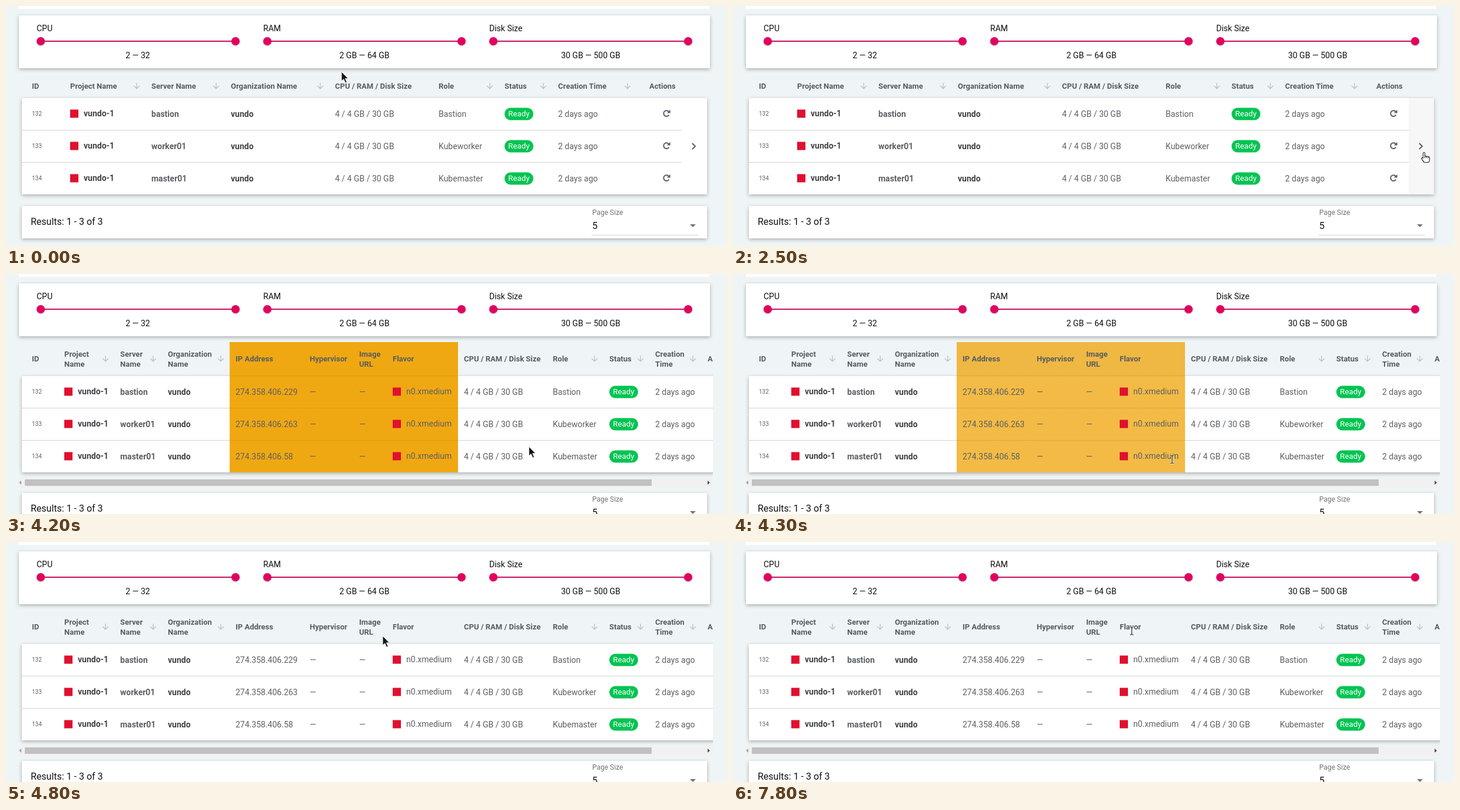
Animation of 1225 by 409 pixels, one loop 8000 ms. Source, as an HTML page:

```html
<!DOCTYPE html>
<html lang="en">
<head>
<meta charset="utf-8">
<title>Server table</title>
<style>
  html, body { margin: 0; width: 100%; height: 100%; overflow: hidden; background: #eff5f6; }
  svg { display: block; width: 1225px; height: 409px; font: 14px Roboto, sans-serif; fill: #5c6064; }
  .card { fill: #fff; filter: drop-shadow(0 2px 3px rgba(0,0,0,.3)); }
  .head { font-size: 13px; font-weight: 700; fill: #565c60; }
  .bold { font-weight: 700; }
  .name { font-weight: 700; fill: #3e4245; }
  .id { font-size: 10px; }
  .black { fill: #111; }
  .big { font-size: 16px; fill: #111; }
  .small { font-size: 12px; fill: #757575; }
  .badge { font-size: 13.3px; fill: #fff; }
  .rule { stroke: #d0d3d4; }
  .knob { fill: #e2005f; filter: drop-shadow(0 1px 1px rgba(0,0,0,.3)); }
  .icon { fill: none; stroke: #5a5f63; stroke-width: 2; }
</style>
</head>
<body>
<svg id="stage" viewBox="0 0 1225 409"></svg>
<script>
const LOOP = 8000, STEP = 100;
const stage = document.getElementById('stage');

const text = (x, y, s, cls = '', extra = '') =>
  `<text x="${x}" y="${y}" class="${cls}" ${extra}>${s}</text>`;
const rect = (x, y, w, h, attrs) =>
  `<rect x="${x}" y="${y}" width="${w}" height="${h}" ${attrs}/>`;
const rule = (x1, x2, y, attrs = 'class="rule"') =>
  `<path d="M${x1} ${y}H${x2}" ${attrs}/>`;
const mark = (x, y) => rect(x, y - 7, 14, 14, 'fill="#e0102f"');
const sortArrow = (x, y) =>
  `<path transform="translate(${x - 8} ${y - 8}) scale(.667)" fill="#bcc1c3"
    d="M20 12l-1.41-1.41L13 16.17V4h-2v12.17l-5.58-5.59L4 12l8 8 8-8z"/>`;

// Cell painters: x, row centre, value
const plain = (x, y, v) => text(x, y + 5, v);
const bold = (x, y, v) => text(x, y + 5, v, 'bold');
const named = (x, y, v) => text(x, y + 5, v, 'name');
const number = (x, y, v) => text(x, y + 3, v, 'id');
const project = (x, y, v) => mark(x, y - .5) + text(x + 23, y + 4, v, 'name');
const flavor = (x, y, v) => mark(x, y - .5) + text(x + 23, y + 4, v);
const badge = (x, y, v) =>
  rect(x, y - 10.5, 49, 21, 'rx="10.5" fill="#03c452"') + text(x + 24.5, y + 4, v, 'badge', 'text-anchor="middle"');
const reload = (x, y) =>
  `<g transform="translate(${x + 29} ${y - 1})"><path class="icon" d="M4 -3A4.9 4.9 0 1 0 4.4 2.6"/>
    <path fill="#5a5f63" d="M6.6 -6.2V-.6H1z"/></g>`;

const same = v => [v, v, v];
// heading, wide x, wide arrow x, narrow x, narrow arrow x, painter, values
const columns = [
  ['ID', 44, 0, 44, 0, number, [132, 133, 134]],
  ['Project Name', 109, 222, 99, 169, project, same('vundo-1')],
  ['Server Name', 247, 357, 194, 250, bold, ['bastion', 'worker01', 'master01']],
  ['Organization Name', 382, 534, 275, 365, named, same('vundo')],
  ['IP Address', 0, 0, 390, 0, plain, ['274.358.406.229', '274.358.406.263', '274.358.406.58']],
  ['Hypervisor', 0, 0, 516, 0, plain, same('—')],
  ['Image URL', 0, 0, 600, 0, plain, same('—')],
  ['Flavor', 0, 0, 657, 0, flavor, same('n0.xmedium')],
  ['CPU / RAM / Disk Size', 559, 0, 778, 0, plain, same('4 / 4 GB / 30 GB')],
  ['Role', 735, 822, 929, 1000, plain, ['Bastion', 'Kubeworker', 'Kubemaster']],
  ['Status', 847, 913, 1025, 1078, badge, same('Ready')],
  ['Creation Time', 938, 1056, 1103, 1167, plain, same('2 days ago')],
  ['Actions', 1093, 0, 1192, 0, reload, same('')]
];
const wrapped = ['Project Name', 'Server Name', 'Organization Name', 'Image URL', 'Creation Time'];

function column([title, wideX, wideArrow, narrowX, narrowArrow, paint, values], expanded) {
  const x = expanded ? narrowX : wideX, arrow = expanded ? narrowArrow : wideArrow;
  if (!x) return '';
  const mid = expanded ? 144.5 : 136.5, firstRow = expanded ? 201 : 184;
  const lines = expanded && wrapped.includes(title) ? title.split(' ') : [title];
  return lines.map((s, i) =>
      text(x, Math.round(mid + 4.5 + (i - (lines.length - 1) / 2) * 17), s, 'head')).join('') +
    (arrow ? sortArrow(arrow, mid) : '') +
    values.map((v, i) => paint(x, firstRow + i * 55, v)).join('');
}

function pager(dy) {
  return `<g transform="translate(0 ${dy})">` +
    rect(27, 341, 1164, 55, 'class="card" rx="1"') +
    text(42, 373, 'Results: 1 - 3 of 3', 'big') +
    text(996, 356, 'Page Size', 'small') + text(996, 380, '5', 'big') +
    '<path d="M1162 372h10l-5 5z" fill="#757575"/>' + rule(995, 1176, 390.5) + '</g>';
}

function table(expanded) {
  const top = expanded ? 174 : 157, right = expanded ? 1230 : 1191, lineEnd = expanded ? 1201 : 1148;
  const rules = (from, to, attrs) => [54.5, 109.5].map(d => rule(from, to, top + d, attrs)).join('');
  let s = `<g ${expanded ? 'clip-path="url(#scrollArea)"' : ''}>` +
    rect(27, top, right - 27, 164, 'class="card" rx="1"');
  if (!expanded) s += rect(1148, 157, 43, 164, 'id="hover" fill="#f7f7f7"');
  s += rules(27, lineEnd);
  if (expanded) {
    const faint = 'stroke="#7a5200" stroke-opacity=".2" stroke-dasharray="2 1"';
    s += '<g id="glow">' + rect(380, 116, 388, 222, 'fill="#efa200"') +
      rule(380, 768, 173.5, faint) + rules(380, 768, faint) + '</g>';
  } else {
    s += '<path class="icon" d="M1166 234l5 5-5 5"/>';
  }
  return s + columns.map(c => column(c, expanded)).join('') + '</g>';
}

function scrollbar() {
  return rect(22, 347, 1179, 17, 'fill="#f1f1f1"') + rect(32, 350, 1065, 11, 'fill="#c1c1c1"') +
    '<path d="M26 352v7l-4-3.5z" fill="#a3a3a3"/><path d="M1192 352v7l4-3.5z" fill="#505050"/>';
}

function slider(label, x, from, to, value, centre) {
  return text(x, 43, label, 'black') +
    rule(from, to, 60, 'stroke="#c8105c" stroke-width="2"') +
    [from, to].map(cx => `<circle class="knob" cx="${cx}" cy="60" r="7"/>`).join('') +
    text(centre, 89, value, 'black', 'text-anchor="middle"');
}

stage.innerHTML =
  '<clipPath id="scrollArea">' + rect(0, 110, 1201, 240, '') + '</clipPath>' +
  rect(0, 0, 1225, 409, 'fill="#eff5f6"') + rect(22, 0, 1173, 5, 'fill="#fff"') +
  rect(22, 16, 1174, 90, 'class="card" rx="2"') +
  slider('CPU', 52, 59, 390, '2 — 32', 224) +
  slider('RAM', 437, 444, 774, '2 GB — 64 GB', 609) +
  slider('Disk Size', 821, 828, 1159, '30 GB — 500 GB', 993.5) +
  '<g id="wide">' + table(false) + pager(0) + '</g>' +
  '<g id="expanded">' + table(true) + scrollbar() + pager(32) + '</g>' +
  `<g id="cursor">
    <path id="arrow" d="M0 0V16L3.7 12.7 6.6 19.2 9.2 18 6.4 11.7H11.4Z" fill="#161616" stroke="#fff" stroke-width=".9"/>
    <g id="beam" fill="none"><path d="M-3 -6.5H-1L0 -5.5 1 -6.5H3M0 -5.5V5.5M-3 6.5H-1L0 5.5 1 6.5H3" stroke="#fff" stroke-width="2.6"/>
      <path d="M-3 -6.5H-1L0 -5.5 1 -6.5H3M0 -5.5V5.5M-3 6.5H-1L0 5.5 1 6.5H3" stroke="#222" stroke-width="1.2"/></g>
    <path id="hand" d="M-1.5 8V1Q-1.5 -.5 0 -.5T1.5 1V6Q3 5 4.3 6.3 6 5.5 7 7 9.5 6.5 9.5 9V12Q9.5 14 8 16.5H0Q-1 14 -3.5 11.5 -5 9.5 -3.5 8.7 -2.5 8.3 -1.5 9.5ZM1.5 6V9M4.3 6.3V9M7 7V9.5" fill="#fff" stroke="#222" stroke-width="1.1" stroke-linejoin="round"/>
  </g>`;

const part = Object.fromEntries(
  ['wide', 'expanded', 'hover', 'glow', 'cursor', 'arrow', 'beam', 'hand'].map(id => [id, document.getElementById(id)]));

// time, x, y, pointer shape from that time on
const path = [
  [0, 570, 112, 'arrow'], [1100, 570, 112, 'arrow'], [1500, 1072, 147, 'arrow'], [1600, 1056, 135, 'arrow'],
  [1700, 1056, 135, 'arrow'], [2200, 1152, 215, 'hand'], [2500, 1174, 250, 'hand'], [3499, 1174, 250, 'hand'],
  [3500, 1173, 250, 'arrow'], [4000, 1173, 250, 'arrow'], [4300, 746, 316, 'beam'], [4400, 520, 292, 'arrow'],
  [4500, 321, 253, 'arrow'], [4600, 249, 195, 'arrow'], [4700, 390, 140, 'arrow'], [4800, 640, 160, 'arrow'],
  [4900, 744, 297, 'arrow'], [5000, 590, 285, 'arrow'], [5100, 369, 200, 'arrow'], [5200, 426, 149, 'beam'],
  [5500, 426, 149, 'beam'], [5600, 428, 150, 'arrow'], [5700, 428, 150, 'arrow'], [5900, 565, 157, 'arrow'],
  [6000, 568, 160, 'arrow'], [6300, 556, 144, 'beam'], [6500, 556, 144, 'beam'], [6800, 613, 144, 'beam'],
  [7300, 613, 144, 'beam'], [7600, 672, 146, 'arrow'], [7700, 676, 150, 'arrow'], [7800, 677.5, 151.5, 'beam'],
  [LOOP, 677.5, 151.5, 'beam']
];

function pointerAt(t) {
  const i = path.findIndex(k => k[0] > t);
  const [t0, x0, y0, shape] = path[i - 1], [t1, x1, y1] = path[i];
  const u = (t - t0) / (t1 - t0);
  return { x: x0 + (x1 - x0) * u, y: y0 + (y1 - y0) * u, shape };
}

function glowAt(t) {
  const u = Math.min(1, Math.max(0, (t - 4100) / 570));
  return (1 + Math.cos(Math.PI * u)) / 2;
}

const show = (el, on) => el.setAttribute('display', on ? 'inline' : 'none');

function render(ms) {
  const t = Math.floor((ms % LOOP) / STEP) * STEP;
  const open = t >= 3500, pointer = pointerAt(t);
  show(part.wide, !open);
  show(part.expanded, open);
  show(part.hover, pointer.shape === 'hand');
  part.glow.setAttribute('opacity', glowAt(t).toFixed(3));
  part.cursor.setAttribute('transform', `translate(${pointer.x} ${pointer.y})`);
  for (const shape of ['arrow', 'beam', 'hand']) show(part[shape], shape === pointer.shape);
}

const start = performance.now();
function tick() {
  render(performance.now() - start);
  requestAnimationFrame(tick);
}
tick();
</script>
</body>
</html>
```
